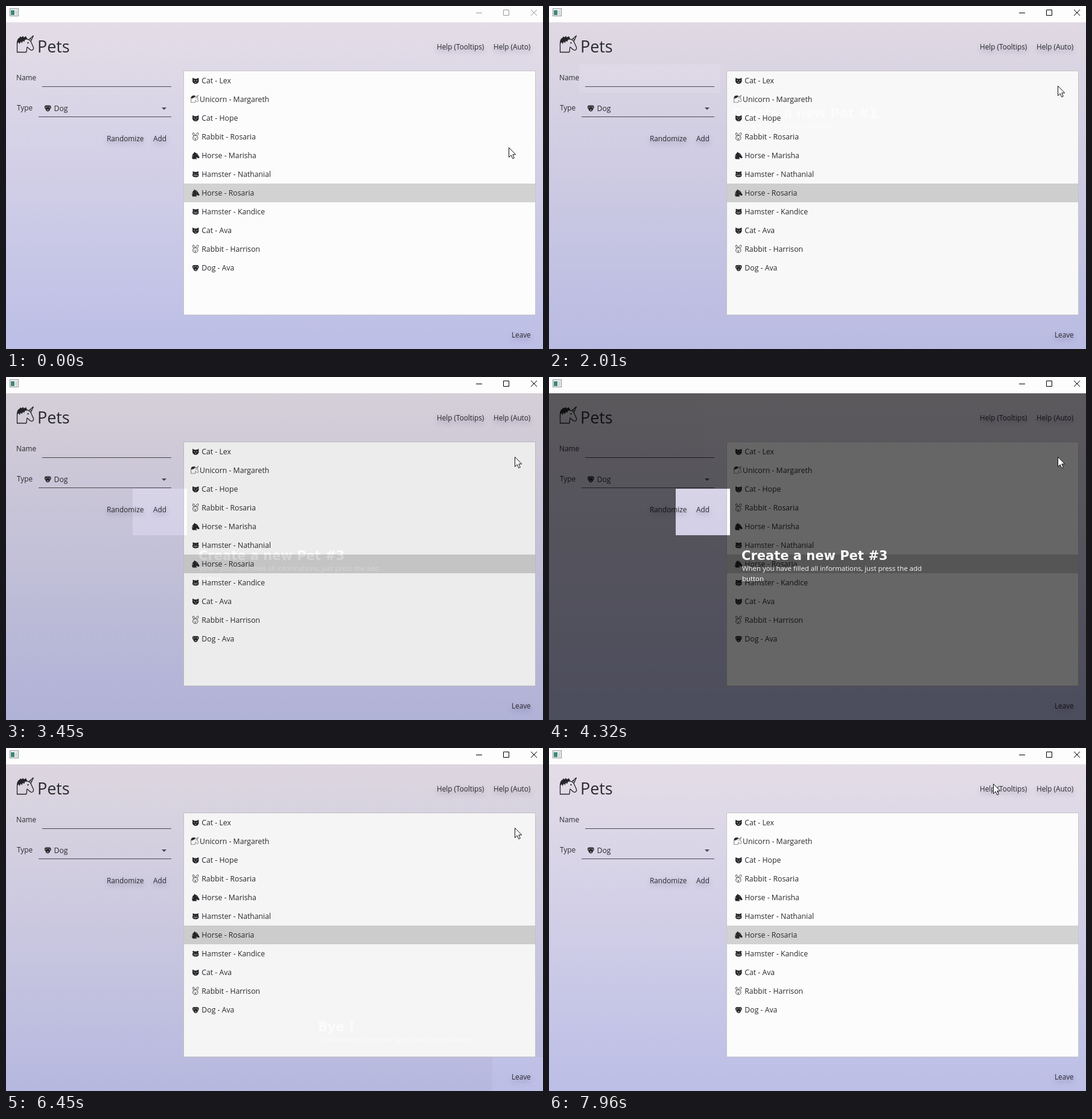
These frames come from a looping animation (890x568 px, 8 s). An HTML page:

```html
<!DOCTYPE html>
<html lang="en">
<head>
<meta charset="utf-8">
<title>Pets</title>
<style>
  html, body { margin: 0; width: 100%; height: 100%; overflow: hidden; background: #fdfdfd; }
  svg.stage { display: block; width: 100vw; height: 100vh; }
  text { font-family: "Open Sans", "Noto Sans", sans-serif; fill: #2b2b2f; white-space: pre; }
  .label { font-size: 11.8px; }
  .item { font-size: 12.25px; }
  .btn { font-size: 11.75px; filter: drop-shadow(0 4px 4px rgba(50, 40, 90, .38)); }
  .heading { font-size: 26.9px; }
  .tip-title { font: bold 21px "DejaVu Sans", sans-serif; fill: #fff; }
  .tip-text { font-size: 11.42px; fill: #fff; }
  .line { stroke: #4b4a50; }
  .controls { fill: none; stroke: #999; animation: focus 8s step-end infinite; }

  /* ease-both: slow first and last fifth, straight between */
  .step {
    opacity: 0;
    animation: 8s infinite;
    animation-timing-function: linear(0, .031 10%, .125 20%, .875 80%, .969 90%, 1);
  }
  #step1 { animation-name: step1; }
  #step2 { animation-name: step2; }
  #step3 { animation-name: step3; }
  #step4 { animation-name: step4; }
  #step5 { animation-name: step5; }
  #cursor { animation: cursor 8s infinite ease-in-out; }

  @keyframes focus { 0% { stroke: #999; } 5.875%, 100% { stroke: #000; } }
  @keyframes step1 {
    0%, 7.5% { opacity: 0; } 13.75%, 19.375% { opacity: 1; } 25.625%, 100% { opacity: 0; }
  }
  @keyframes step2 {
    0%, 25.625% { opacity: 0; } 31.875%, 35.875% { opacity: 1; } 42.125%, 100% { opacity: 0; }
  }
  @keyframes step3 {
    0%, 42.125% { opacity: 0; } 48.375%, 52.65% { opacity: 1; } 58.9%, 100% { opacity: 0; }
  }
  @keyframes step4 {
    0%, 58.9% { opacity: 0; } 65%, 73.688% { opacity: 1; } 79.938%, 100% { opacity: 0; }
  }
  @keyframes step5 {
    0%, 79.938% { opacity: 0; } 86.188%, 90.875% { opacity: 1; } 97.125%, 100% { opacity: 0; }
  }
  @keyframes cursor {
    0%, .6% { transform: translate(833px, 234px); }
    3.6%, 8.2% { transform: translate(851px, 58px); }
    12.8%, 94% { transform: translate(843px, 132px); }
    99.2%, 100% { transform: translate(736px, 59px); }
  }
</style>
</head>
<body>
<svg class="stage" viewBox="0 0 890 568" xmlns="http://www.w3.org/2000/svg">
  <defs>
    <linearGradient id="sky" x1="0" y1="0" x2="0" y2="1">
      <stop offset="0" stop-color="#e4dde7"/>
      <stop offset="1" stop-color="#bcbee6"/>
    </linearGradient>

    <symbol id="Unicorn" viewBox="0 0 30 30">
      <path d="M1.5 13V28.5H16.5C18.2 25.5 16.8 22.5 18 20C21 21.5 22.5 25.2 25.5 25.4C28 25 29 22.8 28.5 20.5L24 10.5C22 8 20 6.8 17 6.8"
        fill="none" stroke="#26262a" stroke-width="1.3"/>
      <path d="M1 15C.8 9 2.5 5.5 5.5 4.5L6.5 2.5L9 3.8L11 1.8L13 4L16 2L18.5 7L14.5 8L13 11.5L11 9.5L9.5 13.5L7.5 11L5.5 15L4 12Z" fill="#26262a"/>
      <path d="M20.5 8L28.5 1L24.3 10.5M23 5.8L25 7.6" fill="none" stroke="#26262a" stroke-width="1.2"/>
      <circle cx="19.5" cy="13" r="1.2" fill="#26262a"/>
    </symbol>
    <symbol id="Cat" viewBox="0 0 12 12">
      <path d="M.7 .8L4 2.6H8L11.3 .8L11.5 7C11 9.8 8.5 11.4 6 11.4S1 9.8 .5 7Z" fill="#26262a"/>
      <path d="M2.8 5.3L4.8 6.2M9.2 5.3L7.2 6.2M4.8 8.6L6 9.3L7.2 8.6" fill="none" stroke="#eee" stroke-width=".9"/>
    </symbol>
    <symbol id="Rabbit" viewBox="0 0 12 14">
      <g fill="none" stroke="#3a3a3e" stroke-width=".9">
        <path d="M3.2 6.5C1.5 4 1 1.5 2.2 .8C3.6 .6 4.8 3 5.2 5.5M6.4 5.5C7 2.5 9 .4 10.6 1.2C11.6 2.4 10 5 8.4 6.3"/>
        <path d="M5.8 5.4C3 5.4 1.6 7.4 1.6 9.6C1.6 12 3.4 13.4 5.8 13.4S10 12 10 9.6C10 7.4 8.6 5.4 5.8 5.4Z"/>
        <path d="M4 8.4V9.4M7.6 8.4V9.4M4.6 11L5.8 10.4L7 11M5.8 10.4V12.4"/>
      </g>
    </symbol>
    <symbol id="Horse" viewBox="0 0 13 13">
      <path d="M4.2 .4L6 2C9 2.8 10.3 5 11 7L12.8 9.5L11.6 11.3L9.4 10.4L7.4 9.3C7.2 10.6 8 11.4 8.6 12.6H1.4C.2 11-.2 8.6 .8 6L2 3.6L3.4 2.6Z" fill="#26262a"/>
      <path d="M7 4.9H8.2M1.9 6.4L1.5 8.6" stroke="#ccc" stroke-width=".7"/>
    </symbol>
    <symbol id="Hamster" viewBox="0 0 12 12">
      <path d="M1 1.4C2 .6 3.2 1 3.8 1.9H8.2C8.8 1 10 .6 11 1.4C11.4 2.4 11 3.2 10.5 3.8C11.8 6 11.8 8.4 10.4 9.8C8 11.4 4 11.4 1.6 9.8C.2 8.4 .2 6 1.5 3.8C1 3.2 .6 2.4 1 1.4Z" fill="#26262a"/>
      <path d="M3.2 5H4.4M7.6 5H8.8M2.2 7.8H4.6L6 7L7.4 7.8H9.8M6 8.2V9.4" fill="none" stroke="#eee" stroke-width=".8"/>
    </symbol>
    <symbol id="Dog" viewBox="0 0 12 12">
      <path d="M3.4 1.2C5 .5 7 .5 8.6 1.2C10 .8 11.4 1.8 11.6 3.6C11.8 5.4 11.2 7 10 7.2C9.8 9.6 8.4 11.4 6 11.4S2.2 9.6 2 7.2C.8 7 .2 5.4 .4 3.6C.6 1.8 2 .8 3.4 1.2Z" fill="#26262a"/>
      <path d="M2.9 3L2.3 6M9.1 3L9.7 6M4.2 4.6H5M7 4.6H7.8M6 7.6V9L4.4 9.6M6 9L7.6 9.6M6 1.8V3.4" fill="none" stroke="#e4e4e4" stroke-width=".8"/>
    </symbol>
  </defs>

  <rect width="890" height="568" fill="#fdfdfd"/>
  <rect y="27" width="890" height="541" fill="url(#sky)"/>

  <!-- title bar -->
  <rect x="6.5" y="4.5" width="14" height="12" fill="#f4f6f6" stroke="#8d9494"/>
  <rect x="8" y="7" width="6" height="8" fill="#3f8578"/>
  <rect x="15" y="7" width="4" height="8" fill="#d3dadb"/>
  <g class="controls">
    <path d="M779 11.5H789M824.5 6.5H833.5V15.5H824.5Z"/>
    <path d="M870 6L880 16M880 6L870 16"/>
  </g>

  <!-- header and form -->
  <use href="#Unicorn" x="17" y="48" width="30" height="30"/>
  <text class="heading" x="52" y="77">Pets</text>
  <text class="btn" x="714" y="72">Help (Tooltips)</text>
  <text class="btn" x="808" y="72">Help (Auto)</text>

  <text class="label" x="17" y="123">Name</text>
  <path class="line" d="M60 133.500H274M54 183.500H274"/>
  <text class="label" x="18" y="173">Type</text>
  <use href="#Dog" x="63.500" y="163.500" width="11.500" height="11.500"/>
  <text class="item" x="79.500" y="174">Dog</text>
  <path d="M258 168H266L262 172Z" fill="#4b4a50"/>
  <text class="btn" x="167" y="224">Randomize</text>
  <text class="btn" x="244" y="224">Add</text>
  <text class="btn" x="838" y="549">Leave</text>

  <!-- pet list -->
  <rect x="294.500" y="107.500" width="583" height="404" fill="#fcfcfc" stroke="#c6c6c9"/>
  <rect x="295" y="294" width="582" height="31" fill="#d2d2d2"/>
  <g id="list"></g>

  <g id="tour"></g>

  <path id="cursor" d="M.5 .5V16.500L4.200 13L6.700 18.700L9.300 17.600L6.800 12H11.700Z" fill="#fff" stroke="#111"/>
</svg>
<script>
  const pets = [
    ["Cat", "Lex"], ["Unicorn", "Margareth"], ["Cat", "Hope"], ["Rabbit", "Rosaria"],
    ["Horse", "Marisha"], ["Hamster", "Nathanial"], ["Horse", "Rosaria"],
    ["Hamster", "Kandice"], ["Cat", "Ava"], ["Rabbit", "Harrison"], ["Dog", "Ava"]
  ];
  // icon offset from the text baseline: x, rise, width, height
  const iconBox = {
    Cat: [308.5, 10, 11.5, 11.5],
    Unicorn: [306, 12, 13.5, 13.5],
    Rabbit: [308, 12, 12, 14],
    Horse: [308, 11, 13, 13],
    Hamster: [308.5, 10, 11.5, 11.5],
    Dog: [308.5, 10, 11.5, 11.5]
  };

  document.getElementById("list").innerHTML = pets.map(([kind, name], i) => {
    const y = 128 + 31 * i;
    const [x, rise, w, h] = iconBox[kind];
    const left = kind === "Unicorn" ? 321 : 324.3;
    return `<use href="#${kind}" x="${x}" y="${y - rise}" width="${w}" height="${h}"/>` +
      `<text class="item" x="${left}" y="${y}">${kind} - ${name}</text>`;
  }).join("");

  // hole: left, top, right, bottom; at: title baseline
  const steps = [
    { hole: [50, 97, 284, 144], at: [303, 185], title: "Create a new Pet #1",
      lines: ["Write the name of your pet here."] },
    { hole: [44, 147, 284, 194], at: [303, 235], title: "Create a new Pet #2",
      lines: ["Select the type of your pet."] },
    { hole: [210, 185, 300, 262], at: [319, 303], title: "Create a new Pet #3",
      lines: ["When you have filled all informations, just press the add", "button"] },
    { hole: [284, 97, 888, 522], at: [8, 58], title: "View all Pet",
      lines: ["After adding a pet, he will appear here, with all his", "friends"] },
    { hole: [806, 512, 890, 568], at: [517, 469], title: "Bye !",
      lines: ["If you want to close the application, press leave."] }
  ];

  document.getElementById("tour").innerHTML = steps.map(({ hole, at, title, lines }, i) => {
    const [l, t, r, b] = hole;
    const [x, y] = at;
    const text = lines.map((line, n) =>
      `<text class="tip-text" x="${x + (x > 8 ? 1 : 0)}" y="${y + 18 + 17 * n}">${line}</text>`).join("");
    return `<g class="step" id="step${i + 1}">` +
      `<path fill-rule="evenodd" fill-opacity=".7" d="M0 27H890V568H0ZM${l} ${t}H${r}V${b}H${l}Z"/>` +
      `<text class="tip-title" x="${x}" y="${y}">${title}</text>${text}</g>`;
  }).join("");
</script>
</body>
</html>
```
